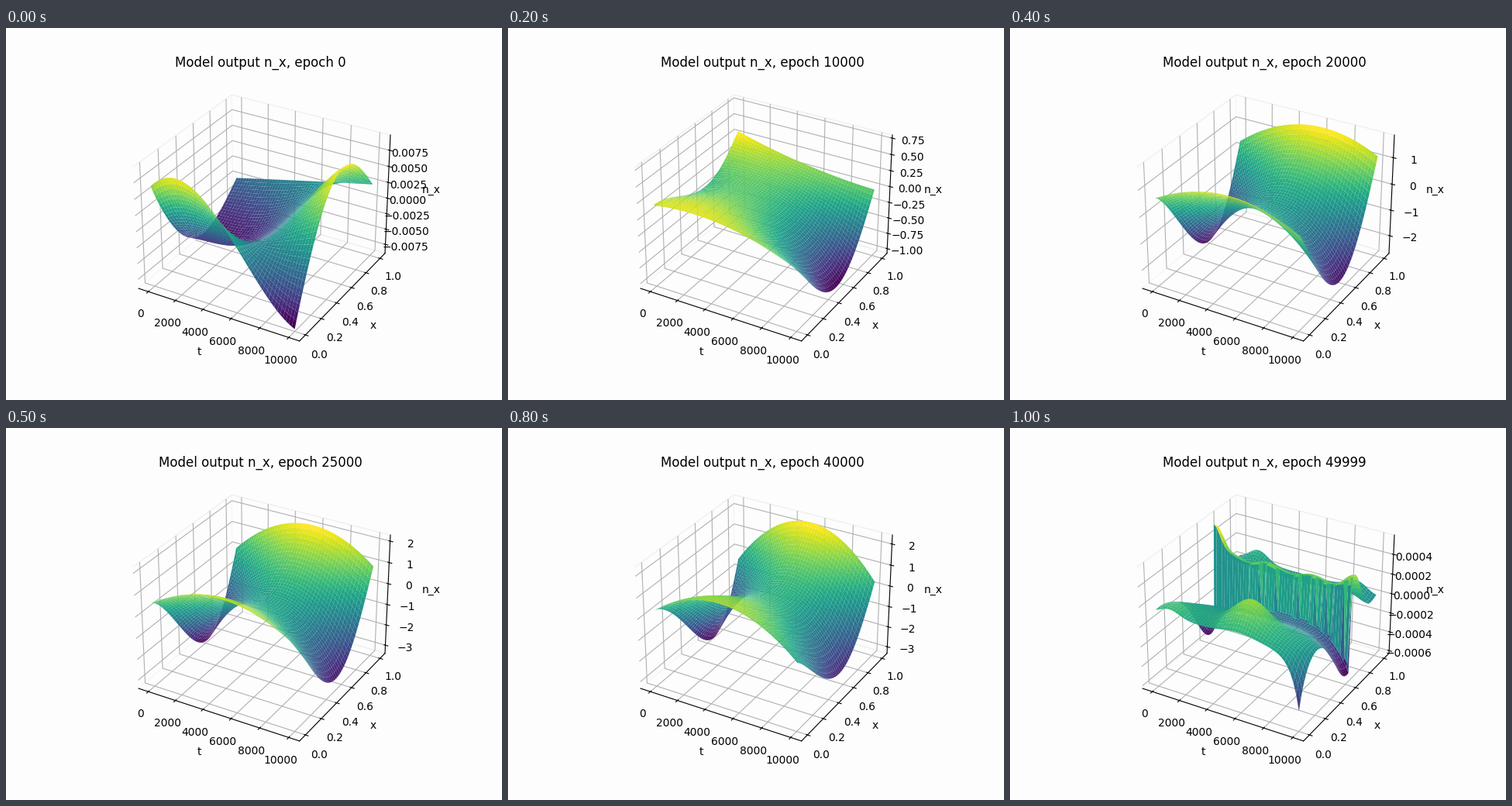
Animation, 640 px wide and 480 px high, one loop 1.1 s. Source, as a matplotlib script:

```python
import matplotlib.pyplot as plt
import numpy as np
from matplotlib.animation import FuncAnimation

N = 51
PAPER = "#fdfdfd"
FRAMES = 11

u = np.linspace(0, 1, N)
T, X = np.meshgrid(u, u, indexing="ij")


def curve(points):
    """Smooth curve over t through evenly spaced heights."""
    knots = np.linspace(0, 1, len(points))
    return np.polyval(np.polyfit(knots, points, len(points) - 1), T)


def bump(t, x, wt, wx):
    return np.exp(-((T - t) / wt) ** 2 - ((X - x) / wx) ** 2)


def fold(near, far, depth, skew):
    """Sheet between its two x edges, with a valley sunk into it."""
    valley = np.sin(np.pi * X ** (1 + skew * (1 - .75 * T)))
    return curve(near) * (1 - X) + curve(far) * X - curve(depth) * valley


def untrained():
    return fold((.832, .936, .69, .3, .02), (.345, .48, .61),
                (.475, .54, .3, -.19, -.64), -.1)


def rising():
    return fold((.564, .405, .115), (.75, .31, .173), (-.31, -.18, .115), 0)


def settling(step):
    e = 2 ** ((3 - step) / 2)
    near = (.60 + .19 * e, .82 + .14 * e, .49 + .40 * e)
    far = (.46 + .29 * e, .99 - .055 * e, .56 + .40 * e)
    depth = (.51 + .23 * e, .27 + .20 * e, .38 + .50 * e)
    return fold(near, far, depth, .09 * step - .04)


def rippled():
    z = .52 - .05 * X + .04 * np.sin(9 * T + 2) * np.cos(10 * X)
    z += .16 * np.sqrt(T) * np.cos(13 * (T - .6)) * np.exp(-((1 - X) / .18) ** 2)
    z += .12 * bump(0, 1, .1, .1) + .08 * bump(.95, 0, .15, .12)
    z -= .12 * bump(0, 0, .1, .2)
    front = z - .47 * bump(0, .47, .1, .22) - .1 * bump(1, .66, .12, .25)
    back = z + .47 * bump(0, .68, .08, .12) + .1 * bump(1, .78, .1, .12)
    return np.where(X > .67, back, front)


def cliff():
    ends = (2 * T - 1) ** 4
    front = .62 + .07 * bump(.1, .05, .1, .12) + .21 * bump(.58, .16, .16, .12)
    front -= .45 * np.exp((T - 1) / .06 - X / .1)
    front -= (.22 + .33 * ends) * np.exp(-((X - .62) / .25) ** 2)
    rim = .22 + .02 * np.sin(20 * T)
    rim += .22 * np.exp(-(T / .06) ** 2) + .1 * np.exp(-((T - 1) / .1) ** 2)
    back = .53 + rim * np.exp(-((X - .68) / .13) ** 2)
    back += .1 * bump(.14, 1, .1, .1) + .07 * bump(.86, 1, .1, .15)
    back -= .05 * bump(1, .88, .08, .12)
    jag = np.random.default_rng(4).choice([.65, .67], N // 2 + 1).repeat(2)[:N]
    return np.where(X > jag[:, None], back, front)


def shape(step):
    """Heights as fractions of the z axis."""
    if step == 0:
        return untrained()
    if step == 1:
        return rising()
    if step == 2:
        return (rising() + settling(3)) / 2
    if step < 9:
        return settling(step)
    return rippled() if step == 9 else cliff()


def z_limits(step):
    keys = (0, 1, 3, 5, 8, 9, 10)
    low = (-.00897, -.1633, -1.99, -3.406, -3.33, -8.78e-8, -6.28e-4)
    high = (.00985, .1964, 1.40, 2.282, 2.42, 9.01e-8, 5.93e-4)
    return np.interp(step, keys, low), np.interp(step, keys, high)


def padded(lo, hi):
    pad = (hi - lo) * (.05 + 1.1 / 48)
    return lo - pad, hi + pad


fig = plt.figure(figsize=(6.4, 4.8), dpi=100, facecolor=PAPER)
ax = fig.add_subplot(projection="3d", facecolor=PAPER)
for axis in (ax.xaxis, ax.yaxis, ax.zaxis):
    axis.set_pane_color((.992, .992, .992, 1))
    axis.pane.set_edgecolor("#f0f0f0")
ax.set_xlim(*padded(0, 10000))
ax.set_ylim(*padded(0, 1))
ax.set_xlabel("t")
ax.set_ylabel("x")
ax.set_zlabel("n_x")
drawn = []


def draw(step):
    while drawn:
        drawn.pop().remove()
    lo, hi = z_limits(step)
    ax.set_zlim(lo, hi)
    drawn.append(ax.plot_surface(T * 10000, X, lo + (hi - lo) * shape(step),
                                 cmap="viridis", rstride=1, cstride=1))
    ax.set_title(f"Model output n_x, epoch {min(5000 * step, 49999)}")
    return drawn


anim = FuncAnimation(fig, draw, frames=FRAMES, interval=100, repeat=True,
                     repeat_delay=0, blit=False)
plt.show()
```
